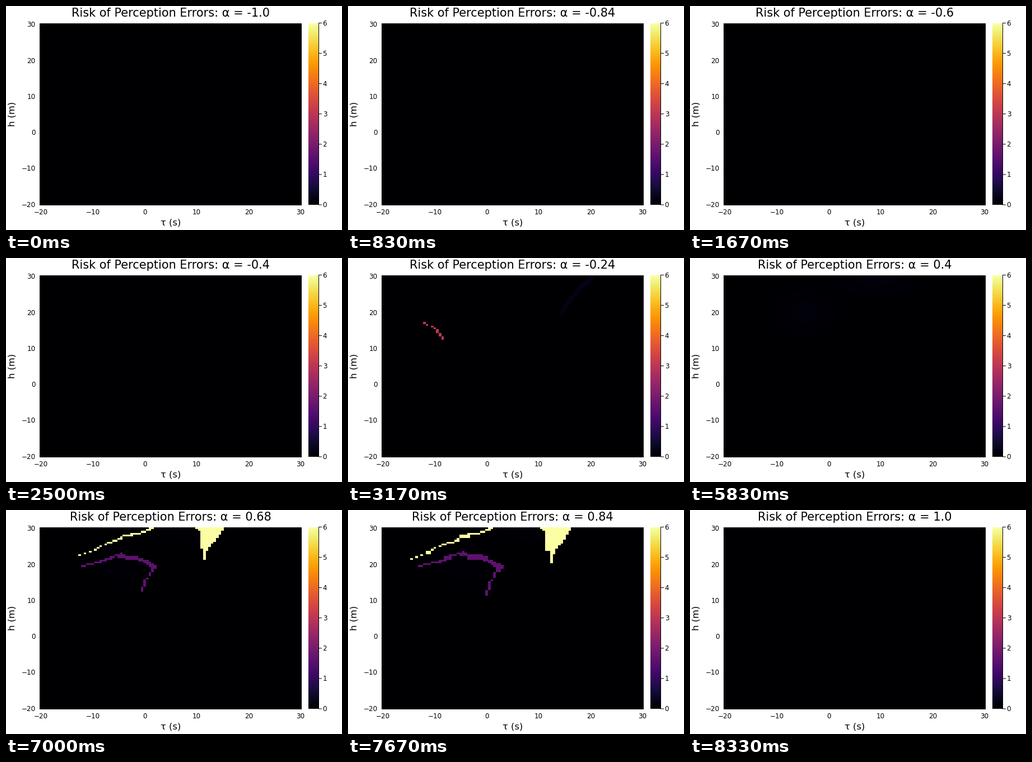
Animation of 600 by 400 pixels, one loop 8.49 s. Source, as a matplotlib script:

```python
import numpy as np
import matplotlib.pyplot as plt
from matplotlib.animation import FuncAnimation

W, H, DPI = 600, 400, 100
FRAMES, LOOP_MS = 51, 8490
LEFT, RIGHT, TOP, BOTTOM = 60, 528, 31, 355
N = 101  # heat map cells per side, half a unit each

plt.rcParams["font.family"] = "DejaVu Sans"
fig = plt.figure(figsize=(W / DPI, H / DPI), dpi=DPI, facecolor="white")
ax = fig.add_axes([0, 0, 1, 1])
ax.axis("off")


def label(x, y, text, px, ha="center", **kw):
    return ax.text(x, y, text, fontsize=px * 72 / DPI, color="black",
                   ha=ha, va="baseline", **kw)


def line(x0, y0, x1, y1):
    ax.plot([x0, x1], [y0, y1], color="black", lw=72 / DPI,
            solid_capstyle="butt", snap=False)


def stroke(points, value, samples=60, ease=1, thick=1):
    """Cells along a path of (column, row) points; ease sets where dots thin out."""
    grid = np.zeros((N, N))
    u = np.linspace(0, 1, samples) ** ease * (len(points) - 1)
    cols, rows = (np.rint(np.interp(u, range(len(points)), axis)).astype(int)
                  for axis in zip(*points))
    for k in range(thick):
        grid[rows + k, cols] = value
    return grid


def wedge(value):
    grid = np.zeros((N, N))
    for r in range(18):
        grid[r, min(60 + r, 62 + r // 12):max(64, 71 - int(0.57 * r))] = value
    return grid


def rescale(grid, factor, row0, col0):
    """Scale a grid about one of its cells, nearest neighbour."""
    k = np.arange(N)
    r = np.rint(row0 + (k - row0) / factor).astype(int)
    c = np.rint(col0 + (k - col0) / factor).astype(int)
    out = np.pad(grid, N)
    return out[np.ix_(r + N, c + N)]


tau, height = np.meshgrid(np.linspace(-20, 30, N), np.linspace(30, -20, N))


def bump(t, h, st, sh):
    return 0.12 * np.exp(-((tau - t) / st) ** 2 / 2 - ((height - h) / sh) ** 2 / 2)


haze = np.maximum(bump(-4.6, 20, 4.3, 4.6), bump(9, 30, 6, 3.9))

early = (stroke([(16, 26), (20, 29), (22, 32.5), (23, 35)], 3, samples=10)
         + stroke([(69, 19.5), (71.5, 14), (76, 6), (81, 0)], 0.25, thick=2)
         + stroke([(19, 8), (23, 4)], 0.06, samples=4))

yellow = wedge(6) + stroke([(15, 15), (25, 9), (33, 4), (38, 2.7), (43, 0)], 6,
                           samples=36, ease=0.8)

purple = np.maximum.reduce([
    stroke([(16, 21), (22, 19), (26, 17), (31, 14)], 1.6, samples=30, ease=0.8),
    stroke([(30, 15), (38, 16.6), (41, 18.4), (43, 20.4)], 1.6, thick=2),
    stroke([(44, 21), (40, 30), (39, 35)], 1.6, samples=16, ease=1.3)])


def field(i):
    risk = np.zeros((N, N))
    if 25 <= i <= 47:
        risk = haze * (1 if i < 39 else 0.6)
    if 17 <= i <= 21:
        risk = rescale(early, 1 + 0.03 * (19 - i), 21, 31)
    if 39 <= i <= 47:
        risk = np.maximum(risk, rescale(purple, 1 + 0.033 * (i - 42), 21, 32))
    if 39 <= i <= 49:
        risk = np.maximum(risk, rescale(yellow, 1 + 0.03 * (i - 42), 0, 50))
    return risk


style = dict(cmap="inferno", vmin=0, vmax=6, aspect="auto", interpolation="nearest")
heat = ax.imshow(field(0), extent=(LEFT, RIGHT, BOTTOM, TOP), **style)
ax.imshow(np.linspace(6, 0, 256)[:, None], extent=(540, 558, BOTTOM, TOP), **style)
ax.set_xlim(0, W)
ax.set_ylim(H, 0)

line(LEFT, BOTTOM + 0.5, RIGHT, BOTTOM + 0.5)
line(558.5, TOP, 558.5, BOTTOM)

for k in range(6):
    text = str(10 * k - 20).replace("-", "\u2212")
    label(62.5 + 92.7 * k, 371.6, text, 11.9)
    label(52.6, 358.6 - 64.27 * k, text, 11.9, ha="right")
for k in range(7):
    y = BOTTOM - 54.1 * k
    line(558, y, 564, y)
    label(565.6, y + 4.2, str(k), 11.9, ha="left")

label(294, 392, "τ (s)", 16.37)
label(16, 193, "h (m)", 16.37, rotation=90, rotation_mode="anchor")
title = label(294, 18.8, "", 20.83)


def update(i):
    heat.set_data(field(i))
    title.set_text(f"Risk of Perception Errors: α = {(4 * i - 100) / 100}")
    return heat, title


anim = FuncAnimation(fig, update, frames=FRAMES, interval=LOOP_MS / FRAMES,
                     repeat=True, repeat_delay=0, blit=False)
plt.show()
```
